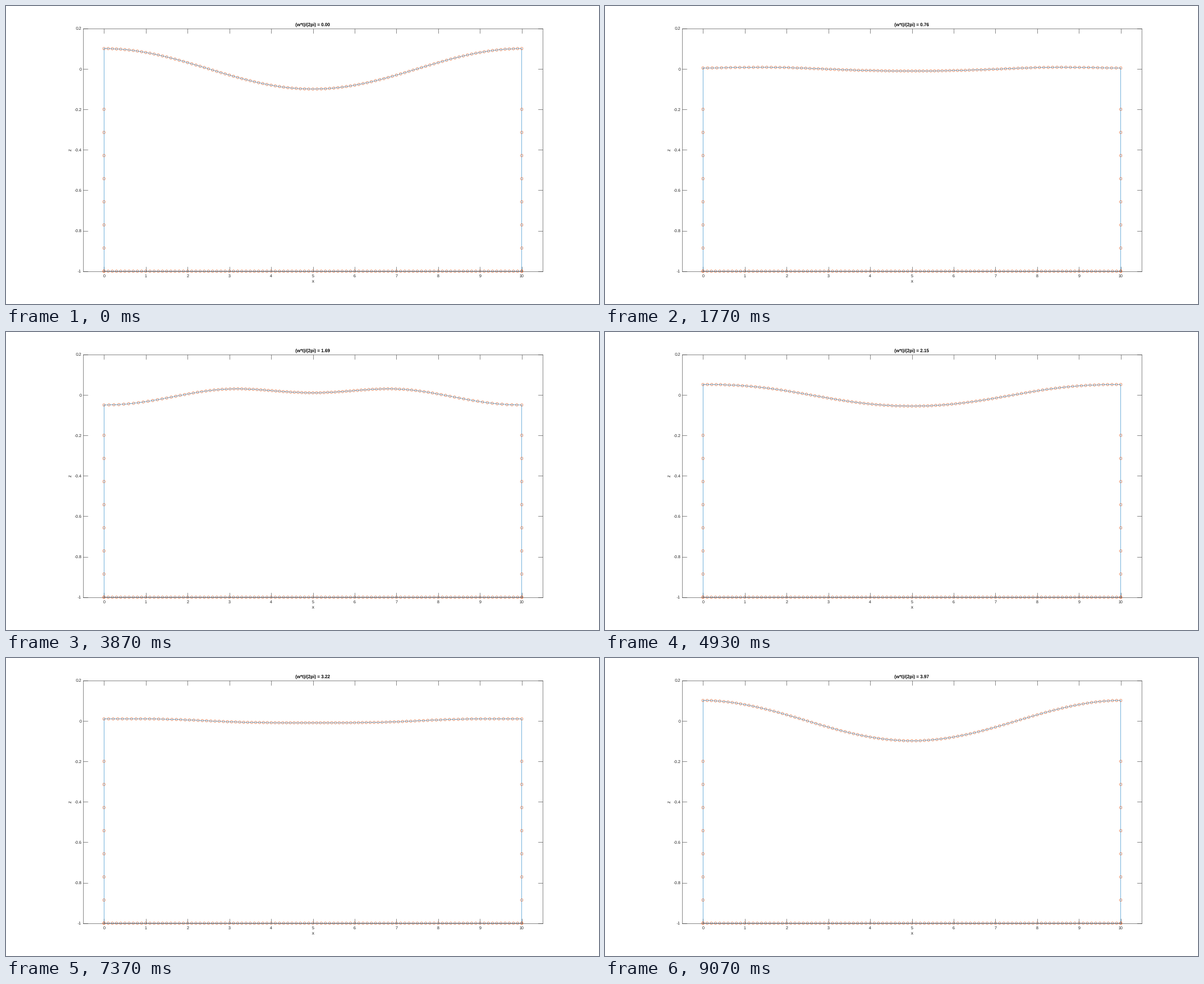
Recreate the animation shown at these times as a matplotlib script. Size 1000 px wide and 502 px high, loop 9.11 s.

```python
import math

import matplotlib.pyplot as plt
import numpy as np
from matplotlib.animation import FuncAnimation

W, H, DPI = 1000, 502, 100
FRAMES, LOOP_MS = 273, 9110
PX = 72 / DPI                      # one pixel in points
LINE = 0.525 * PX
DARK, BLUE, ORANGE = "#262626", "#0072BD", "#D95319"

# Tank and standing wave
LENGTH, DEPTH, AMP, GRAV = 10.0, 1.0, 0.1, 9.81
STEPS = 68                         # frames per linear wave period
SUB = 2                            # integration steps per frame
N, MODES, ORDER = 64, 12, 5

k1 = 2 * math.pi / LENGTH
period = 2 * math.pi / math.sqrt(GRAV * k1 * math.tanh(k1 * DEPTH))
K = k1 * np.arange(N // 2 + 1)
KEEP = np.arange(N // 2 + 1) <= MODES
TANH = np.tanh(K * DEPTH)


def smooth(f):
    return np.fft.irfft(np.fft.rfft(f) * KEEP, N)


def ddx(f):
    return np.fft.irfft(1j * K * KEEP * np.fft.rfft(f), N)


def ddz(f, j):
    """j-th vertical derivative at the still water level."""
    mult = K ** j * (TANH if j % 2 else 1.0) * KEEP
    return np.fft.irfft(mult * np.fft.rfft(f), N)


def sample(f, x):
    """Trigonometric interpolation of grid values f at points x."""
    c = np.fft.rfft(f)[:MODES + 1] * 2 / N
    c[0] /= 2
    return (np.exp(1j * np.outer(x, K[:MODES + 1])) @ c).real


def surface_w(eta, psi):
    """Vertical velocity on the free surface, by expansion in eta."""
    power = [eta ** j / math.factorial(j) for j in range(ORDER + 1)]
    phi = [psi]
    for m in range(1, ORDER):
        phi.append(-smooth(sum(power[j] * ddz(phi[m - j], j)
                               for j in range(1, m + 1))))
    return smooth(sum(power[j] * ddz(phi[m - j], j + 1)
                      for m in range(ORDER) for j in range(m + 1)))


def rates(state):
    eta, psi, x = state
    w = surface_w(eta, psi)
    ex, px = ddx(eta), ddx(psi)
    stretch = (1 + ex ** 2) * w
    return (smooth(stretch - px * ex),
            smooth(-GRAV * eta - px ** 2 / 2 + stretch * w / 2),
            sample(px - w * ex, x))


def shifted(state, rate, dt):
    return tuple(s + dt * r for s, r in zip(state, rate))


def rk4(state, dt):
    a = rates(state)
    b = rates(shifted(state, a, dt / 2))
    c = rates(shifted(state, b, dt / 2))
    d = rates(shifted(state, c, dt))
    mean = [(p + 2 * q + 2 * r + s) / 6 for p, q, r, s in zip(a, b, c, d)]
    return shifted(state, mean, dt)


def simulate():
    """Surface particle positions (x, z) for every time step."""
    grid = np.arange(N) * LENGTH / N
    state = (AMP * np.cos(k1 * grid), np.zeros(N), np.linspace(0, LENGTH, 101))
    path = []
    for _ in range(FRAMES):
        path.append((state[2], sample(state[0], state[2])))
        for _ in range(SUB):
            state = rk4(state, period / STEPS / SUB)
    return path


surface = simulate()

side = np.linspace(-0.2, -DEPTH, 8)
floor = np.linspace(LENGTH, 0, 101)
wall_x = np.concatenate([np.full(8, LENGTH), floor, np.zeros(8)])
wall_z = np.concatenate([side, np.full(101, -DEPTH), side[::-1]])

plt.rcParams.update({"font.family": "Liberation Sans", "text.hinting": "none"})
# The small margin keeps the pixel size from being rounded down.
fig = plt.figure(figsize=((W + 0.01) / DPI, (H + 0.01) / DPI), dpi=DPI,
                 facecolor="white")
ax = fig.add_axes([0.13, 0.11, 0.775, 0.815])
ax.set(xlim=(-0.5, 10.5), ylim=(-1, 0.2),
       xticks=range(11), yticks=np.linspace(-1, 0.2, 7))
ax.tick_params(direction="in", length=7.75 * PX, width=LINE, color=DARK,
               top=True, right=True, labelbottom=False, labelleft=False)
for spine in ax.spines.values():
    spine.set(linewidth=LINE, edgecolor=DARK)


def label(x, y, s, size=7.0, ha="center", color=DARK, **kw):
    return fig.text(x / W, 1 - y / H, s, fontsize=size * PX, ha=ha,
                    va="baseline", color=color, **kw)


for i in range(11):
    label(165.23 + 70.4545 * i, 456.8, str(i))
for i in range(7):
    label(127.3, 40.3 + 68.19 * i, f"{(1 - i) / 5:.1g}", ha="right")
label(517.5, 466.2, "x", 7.7)
label(111, 242.2, "z", 7.7, rotation=90, rotation_mode="anchor")
title = label(517.5, 34.7, "", 7.7, color="black", weight="bold")

outline, = ax.plot([], [], color=BLUE, lw=LINE, clip_on=False, zorder=4)
rings = ax.scatter(np.zeros(218), np.zeros(218), s=(4.2 * PX) ** 2,
                   facecolors="none", edgecolors=ORANGE,
                   linewidths=[LINE, LINE], clip_on=False, zorder=5)


def draw(n):
    step = max(n - 1, 0)           # the opening state is held once
    x, z = surface[step]
    x, z = np.append(x, wall_x), np.append(z, wall_z)
    outline.set_data(np.append(x, x[0]), np.append(z, z[0]))
    rings.set_offsets(np.column_stack([x, z]))
    title.set_text(f"(w*t)/(2pi) = {step / STEPS:.2f}")
    return outline, rings, title


anim = FuncAnimation(fig, draw, frames=FRAMES, interval=LOOP_MS / FRAMES,
                     init_func=lambda: draw(0), repeat=True, repeat_delay=0)
plt.show()
```
